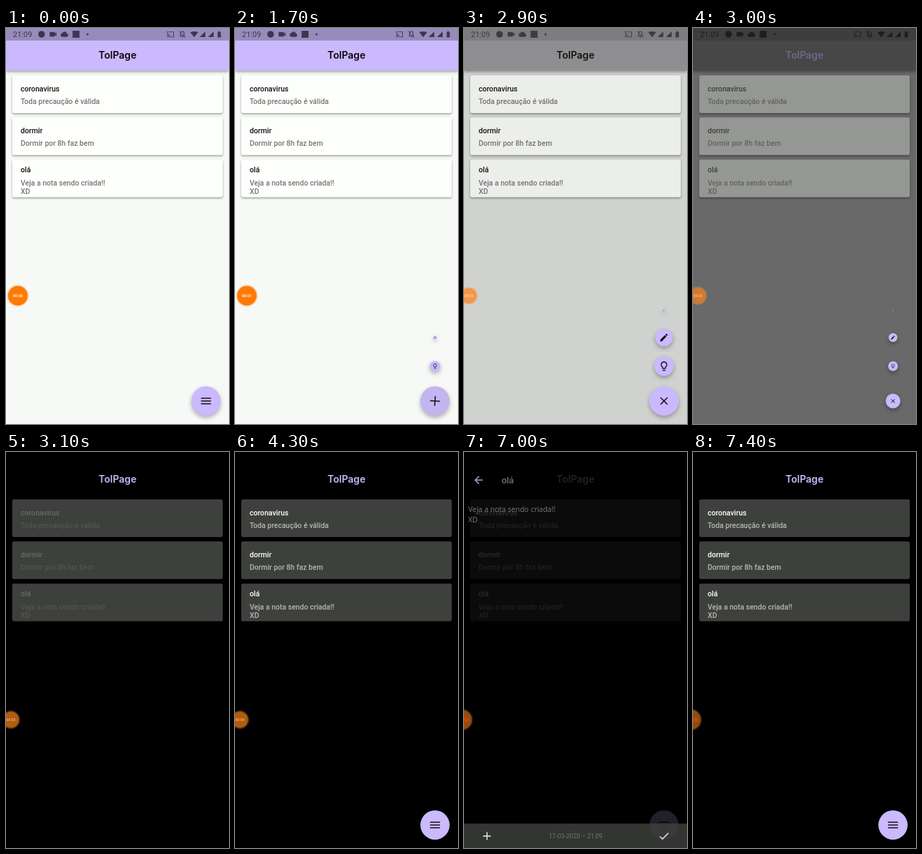
Write an HTML page with a canvas that moves like this. It is 320 px wide and 568 px high and loops after 8000 ms.

```html
<!DOCTYPE html>
<html lang="pt">
<head>
<meta charset="utf-8">
<title>Notas</title>
<style>
html, body { margin: 0; width: 100%; height: 100%; overflow: hidden; background: #000; }
canvas { display: block; width: 320px; height: 568px; }
</style>
</head>
<body>
<canvas id="stage"></canvas>
<script>
const W = 320, H = 568, LOOP = 8000, STEP = 100;
const canvas = document.getElementById('stage');
const ctx = canvas.getContext('2d');
const dpr = window.devicePixelRatio || 1;
canvas.width = W * dpr;
canvas.height = H * dpr;

const LILAC = '#cab9fc';
const ROBOTO = 'Roboto, sans-serif', INTER = 'Inter, sans-serif', OPEN = '"Open Sans", sans-serif';

// Icons on a 24-unit grid
const ICON = {
  menu: 'M3 18h18v-2H3v2zm0-5h18v-2H3v2zm0-7v2h18V6H3z',
  close: 'M19 6.41L17.59 5 12 10.59 6.41 5 5 6.41 10.59 12 5 17.59 6.41 19 12 13.41 17.59 19 19 17.59 13.41 12z',
  add: 'M19 13h-6v6h-2v-6H5v-2h6V5h2v6h6v2z',
  check: 'M9 16.17L4.83 12l-1.42 1.41L9 19l12-12-1.41-1.41z',
  back: 'M20 11H7.83l5.59-5.59L12 4l-8 8 8 8 1.41-1.41L7.83 13H20v-2z',
  pencil: 'M3 17.25V21h3.75L17.81 9.94l-3.75-3.75L3 17.25zM20.71 7.04a1 1 0 0 0 0-1.41l-2.34-2.34a1 1 0 0 0-1.41 0l-1.83 1.83 3.75 3.75 1.83-1.83z',
  bulb: 'M9 21c0 .55.45 1 1 1h4c.55 0 1-.45 1-1v-1H9v1zm3-19C8.14 2 5 5.14 5 9c0 2.38 1.19 4.47 3 5.74V17c0 .55.45 1 1 1h6c.55 0 1-.45 1-1v-2.26c1.81-1.27 3-3.36 3-5.74 0-3.86-3.14-7-7-7zm2.85 11.1l-.85.6V16h-4v-2.3l-.85-.6A5 5 0 0 1 7 9c0-2.76 2.24-5 5-5s5 2.24 5 5c0 1.63-.8 3.16-2.15 4.1z',
  theme: 'M12 3a9 9 0 0 0 0 18zM12 3a9 9 0 0 1 0 18v-2a7 7 0 0 0 0-14z',
  video: 'M17 10.5V7l-1-1H4L3 7v10l1 1h12l1-1v-3.5l4 4v-11z',
  cloud: 'M19.35 10.04A7.5 7.5 0 0 0 5.35 8.04A6 6 0 0 0 6 20h13a5 5 0 0 0 .35-9.96z',
  cast: 'M21 3H3c-1.1 0-2 .9-2 2v3h2V5h18v14h-7v2h7c1.1 0 2-.9 2-2V5c0-1.1-.9-2-2-2zM1 18v3h3c0-1.66-1.34-3-3-3zm0-4v2c2.76 0 5 2.24 5 5h2c0-3.87-3.13-7-7-7zm0-4v2a9 9 0 0 1 9 9h2c0-6.08-4.93-11-11-11z',
  bell: 'M12 3a6 6 0 0 0-6 6v6l-2 3h16l-2-3V9a6 6 0 0 0-6-6zm-2 17h4v2h-4zM8 9a4 4 0 0 1 8 0v7H8z',
  wifi: 'M12 21L24 6C20 2.5 4 2.5 0 6z',
  signal: 'M2 22h20V2z',
  battery: 'M7 5h3V2h4v3h3v17H7z'
};
for (const k in ICON) ICON[k] = new Path2D(ICON[k]);

// Colours of the theme change at each key time
const KEYS = [2800, 2900, 3100, 3400];
const THEME = {
  bar: ['cab9fc', '8e8d8f', '000000', '000000'],
  status: ['978bbc', '7d7c7e', '000000', '000000'],
  ink: ['3c3750', '3c3c3e', '000000', '000000'],
  bg: ['f7f9f6', 'd0d2cf', '000000', '000000'],
  card: ['fdfffc', 'eceeeb', '3e403d', '3e403d'],
  head: ['111111', '151515', '686a67', 'ffffff'],
  body: ['757575', '727272', '52544f', 'b6b8b5'],
  title: ['08060c', '141414', 'cab9fc', 'cab9fc']
};

const clamp = x => Math.max(0, Math.min(1, x));
const mix = (a, b, p) => a + (b - a) * p;

// Linear interpolation through [time, value] points
function track(t, ...pts) {
  if (t <= pts[0][0]) return pts[0][1];
  for (let i = 1; i < pts.length; i++) {
    const [t0, a] = pts[i - 1], [t1, b] = pts[i];
    if (t < t1) return mix(a, b, (t - t0) / (t1 - t0));
  }
  return pts[pts.length - 1][1];
}

function themeAt(t) {
  const out = {};
  for (const name in THEME) {
    const rgb = [0, 2, 4].map(i => Math.round(
      track(t, ...KEYS.map((k, j) => [k, parseInt(THEME[name][j].substr(i, 2), 16)]))));
    out[name] = `rgb(${rgb})`;
  }
  return out;
}

function bezier(x1, y1, x2, y2) {
  const at = (a, b, s) => 3 * a * s * (1 - s) ** 2 + 3 * b * s * s * (1 - s) + s ** 3;
  return x => {
    let lo = 0, hi = 1;
    for (let i = 0; i < 24; i++) {
      const m = (lo + hi) / 2;
      if (at(x1, x2, m) < x) lo = m; else hi = m;
    }
    return at(y1, y2, lo);
  };
}
const fastOutSlowIn = bezier(.4, 0, .2, 1), easeIn = bezier(.42, 0, 1, 1);

function text(str, x, y, font, color, align = 'left') {
  ctx.font = font;
  ctx.fillStyle = color;
  ctx.textAlign = align;
  ctx.fillText(str, x, y);
}

function icon(name, x, y, size, color, turn = 0) {
  ctx.save();
  ctx.translate(x, y);
  ctx.rotate(turn);
  ctx.scale(size / 24, size / 24);
  ctx.translate(-12, -12);
  ctx.fillStyle = color;
  ctx.fill(ICON[name], 'evenodd');
  ctx.restore();
}

function disc(x, y, r, color) {
  ctx.fillStyle = color;
  ctx.beginPath();
  ctx.arc(x, y, r, 0, Math.PI * 2);
  ctx.fill();
}

function shadow(blur, dy, alpha) {
  ctx.shadowColor = `rgba(0,0,0,${alpha})`;
  ctx.shadowBlur = blur * dpr;
  ctx.shadowOffsetY = dy * dpr;
}

function statusBar(c) {
  ctx.fillStyle = c.status;
  ctx.fillRect(0, 0, W, 18);
  text('21:09', 10, 13.2, '400 11px ' + ROBOTO, c.ink);
  disc(51, 9, 4.8, c.ink);
  icon('video', 67.5, 9, 13, c.ink);
  icon('cloud', 84, 9, 11, c.ink);
  ctx.fillStyle = c.ink;
  ctx.fillRect(95.5, 4, 10, 10);
  disc(117, 9, 1.5, c.ink);
  icon('cast', 236, 9, 11, c.ink);
  icon('bell', 253, 9, 12, c.ink);
  ctx.strokeStyle = c.ink;
  ctx.lineWidth = 1;
  ctx.beginPath();
  ctx.moveTo(248.5, 4.5);
  ctx.lineTo(257.5, 14);
  ctx.stroke();
  icon('wifi', 270, 9, 11, c.ink);
  icon('signal', 282, 9, 9.5, c.ink);
  icon('signal', 294, 9, 9.5, c.ink);
  icon('battery', 306, 9, 11, c.ink);
}

function card(y, c, head, lines, headY, bodyY) {
  ctx.save();
  shadow(3, 1.5, .38);
  ctx.fillStyle = c.card;
  ctx.beginPath();
  ctx.roundRect(9, y, 302, 54, 2.5);
  ctx.fill();
  ctx.restore();
  text(head, 21, headY, '500 10.6px ' + ROBOTO, c.head);
  lines.forEach((s, i) => text(s, 21, bodyY + i * 12, '500 10.5px ' + ROBOTO, c.body));
}

function button(x, y, r, s, color, glyph, size, turn = 0, alpha = 1) {
  if (s <= 0) return;
  ctx.save();
  ctx.globalAlpha *= alpha;
  ctx.translate(x, y);
  ctx.scale(s, s);
  ctx.save();
  shadow(6, 3, .3);
  disc(0, 0, r, color);
  ctx.restore();
  icon(glyph, 0, 0, size, '#15101e', turn);
  ctx.restore();
}

function dial(t) {
  const open = clamp((t - 1300) / 600) ** 1.5;
  const closing = t >= 2900;
  if (t < 3100) {
    const shut = t >= 3000 ? .5 : 1;
    const scale = closing ? [shut, .9 * shut, .2 * shut]
      : [open, (open - .44) / .56, (open - .6) / .4];
    button(287, 405, 14, scale[2], LILAC, 'theme', 16, 0, closing ? .3 : 1);
    button(287, 444, 14, scale[1], LILAC, 'pencil', 16);
    button(287, 485, 14, scale[0], LILAC, 'bulb', 16);
  }
  const isOpen = open > 0 && t < 3100;
  const size = track(t, [2900, 1], [3100, 0], [3400, 1]);
  const pressed = t >= 1000 && t < 1900;
  button(287, 535, 21, size, pressed ? '#c3b5ee' : LILAC,
    isOpen ? 'close' : 'menu', 19, isOpen ? open * Math.PI / 2 : 0);
}

function listPage(t) {
  const c = themeAt(t);
  ctx.fillStyle = c.bg;
  ctx.fillRect(0, 0, W, H);
  ctx.save();
  shadow(4, 2, .35);
  ctx.fillStyle = c.bar;
  ctx.fillRect(0, 0, W, 61);
  ctx.restore();
  statusBar(c);
  text('TolPage', 160, 44.3, '600 14px ' + INTER, c.title, 'center');
  card(68, c, 'coronavirus', ['Toda precaução é válida'], 90.6, 108.8);
  card(128.3, c, 'dormir', ['Dormir por 8h faz bem'], 150.9, 169);
  card(188.7, c, 'olá', ['Veja a nota sendo criada!!', 'XD'], 207.4, 225.7);
  dial(t);
}

function notePage(p) {
  if (p <= 0) return;
  ctx.save();
  ctx.globalAlpha = easeIn(p);
  ctx.translate(0, H / 4 * (1 - fastOutSlowIn(p)));
  ctx.fillStyle = '#000';
  ctx.fillRect(0, 0, W, H);
  icon('back', 21, 39.3, 18, LILAC);
  text('olá', 54, 44, '600 12px ' + INTER, '#858585');
  text('Veja a nota sendo criada!!', 6, 85, '400 10.5px ' + OPEN, '#919191');
  text('XD', 6, 99.7, '400 10.5px ' + OPEN, '#919191');
  ctx.fillStyle = '#3e403d';
  ctx.fillRect(0, 532, W, 36);
  icon('add', 33, 550, 19, '#fff');
  text('17-03-2020 – 21:09', 160, 553, '300 9px ' + ROBOTO, '#a2a4a1', 'center');
  icon('check', 287, 550, 18, '#fff');
  ctx.restore();
}

// Floating recorder bubble with its seconds counter
function recorder(t) {
  const x = track(t, [2000, 17], [2300, 7], [5000, 7], [5200, -3]);
  const r = track(t, [2000, 15], [2300, 12.5], [5000, 12.5], [5200, 15]);
  const sec = [800, 1900, 2900, 4300].filter(s => t >= s).length;
  ctx.save();
  ctx.globalAlpha = track(t, [2000, 1], [2300, .6], [5000, .6], [5200, .47]);
  disc(x, 384, r + .7, 'rgba(255,170,100,.45)');
  disc(x, 384, r - 1, '#ff7a05');
  if (t >= 5200) disc(3.5, 384, 3.5, '#ff3c0c');
  else text('00:0' + sec, x, 386, `500 ${5.8 * r / 15}px ` + ROBOTO, '#fff', 'center');
  ctx.restore();
}

function draw(t) {
  ctx.setTransform(dpr, 0, 0, dpr, 0, 0);
  listPage(t);
  notePage(track(t, [4450, 0], [4800, 1], [6960, 1], [7340, 0]));
  recorder(t);
}

const start = performance.now();
function tick() {
  const t = (performance.now() - start) % LOOP;
  draw(Math.floor((t + 4) / STEP) * STEP % LOOP);
  requestAnimationFrame(tick);
}
tick();
</script>
</body>
</html>
```
